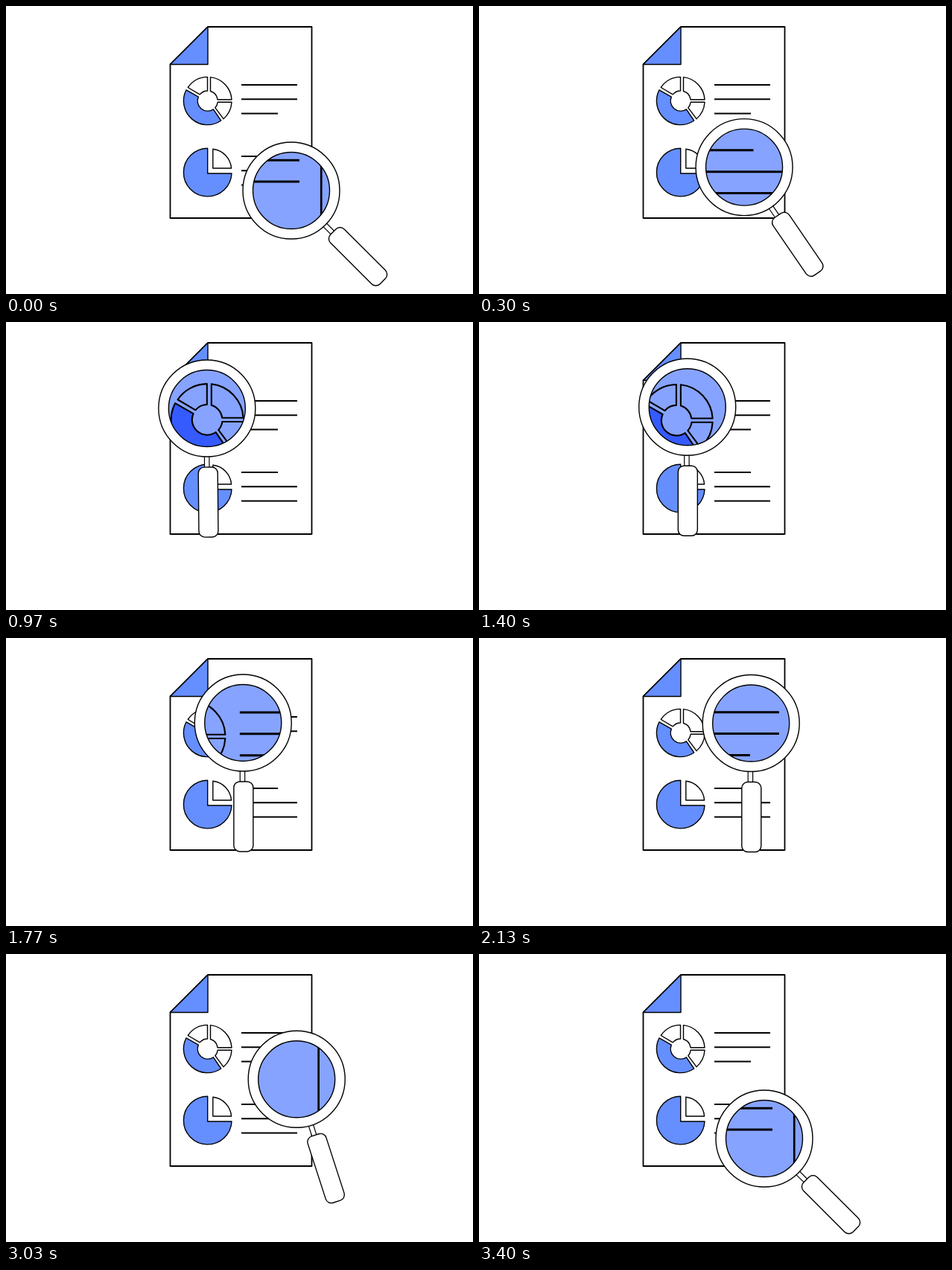
An HTML page with a canvas that plays this animation: 627 px wide and 387 px high, repeating every 3.66 s.

```html
<!DOCTYPE html>
<html lang="en">
<head>
<meta charset="utf-8">
<title>Report search</title>
<style>
html, body { margin: 0; width: 100%; height: 100%; overflow: hidden; background: #fff; }
canvas { display: block; }
</style>
</head>
<body>
<canvas id="stage" width="627" height="387"></canvas>
<script>
const ctx = document.getElementById('stage').getContext('2d');
const LOOP = 3660, BLUE = '#658eff', TINT = '#86a3ff', ZOOM = 1.5;

// Each move: start and end time, easing handles, poses [x, y, degrees], upward bow.
const rest = [383, 248, 45], left = [268.5, 114.5, 0], right = [395, 115.5, 0];
const moves = [
  { t0: 0, t1: 1050, ease: [0.3, 0.6], from: rest, to: left, bow: 0 },
  { t0: 1050, t1: 2690, ease: [0.44, 0.56], from: left, to: right, bow: 1 },
  { t0: 2690, t1: 3400, ease: [0.53, 0.56], from: right, to: rest, bow: 0 }
];

function easeInOut(u, [x1, x2]) {
  let lo = 0, hi = 1, s = 0.5;
  for (let i = 0; i < 24; i++) {
    s = (lo + hi) / 2;
    const x = 3 * s * (1 - s) ** 2 * x1 + 3 * s * s * (1 - s) * x2 + s ** 3;
    if (x < u) lo = s; else hi = s;
  }
  return s * s * (3 - 2 * s);
}

function poseAt(t) {
  const m = moves.find(move => t < move.t1);
  if (!m) return rest;
  const p = easeInOut((t - m.t0) / (m.t1 - m.t0), m.ease);
  const [x, y, angle] = m.from.map((v, i) => v + (m.to[i] - v) * p);
  return [x, y - 4 * m.bow * p * (1 - p), angle];
}

function shape(d, fill, width = 1.4) {
  const path = new Path2D(d);
  if (fill) {
    ctx.fillStyle = fill;
    ctx.fill(path);
  }
  ctx.lineWidth = width;
  ctx.stroke(path);
}

function ringSegment(x1, y1, x2, y2, x3, y3, x4, y4, fill) {
  shape(`M${x1} ${y1}A32.1 32.1 0 0 1 ${x2} ${y2}L${x3} ${y3}A13.6 13.6 0 0 0 ${x4} ${y4}Z`, fill);
}

function drawPage() {
  shape('M271 28H410.5V285H220.5V78.5Z', '#fff', 1.8);
  shape('M271 28V78.5H220.5Z', BLUE);

  ringSegment(244.3, 109.5, 270.5, 95.4, 270.5, 114, 260.2, 118.9, '#fff');
  ringSegment(274.5, 95.6, 303, 125.8, 284.1, 125.8, 274.5, 114.5, '#fff');
  ringSegment(303, 129.3, 292, 151.7, 280.8, 136.7, 284.2, 129.3, '#fff');
  ringSegment(288.7, 154, 242, 112.8, 258.3, 122.1, 278.4, 138.8, BLUE);

  shape('M270.7 225H303A32.3 32.3 0 1 1 270.7 191.3Z', BLUE);
  shape('M277.8 218V192.3A28 28 0 0 1 302.6 218Z', '#fff');

  shape('M316 106H391M316 125.2H391M316 144.5H365', null, 2);
  shape('M316 202H365M316 221.2H391M316 240.4H391', null, 2);
}

function circle(r) {
  ctx.beginPath();
  ctx.arc(0, 0, r, 0, 2 * Math.PI);
}

function drawGlass([x, y, angle]) {
  ctx.save();
  ctx.translate(x, y);

  // Handle
  ctx.save();
  ctx.rotate(-angle * Math.PI / 180);
  shape('M-4 62H2.4V82H-4Z', '#fff', 1.2);
  ctx.beginPath();
  ctx.roundRect(-12.4, 79, 26, 94, 8);
  ctx.fill();
  ctx.lineWidth = 1.4;
  ctx.stroke();
  ctx.restore();

  // Enlarged page seen through the lens
  ctx.save();
  circle(65);
  ctx.fillStyle = '#fff';
  ctx.fill();
  circle(51.5);
  ctx.clip();
  ctx.save();
  ctx.translate(-1, -2 + angle / 30);
  ctx.scale(ZOOM, ZOOM);
  ctx.translate(-x, -y);
  drawPage();
  ctx.restore();
  ctx.globalCompositeOperation = 'multiply';
  ctx.fillStyle = TINT;
  ctx.fillRect(-60, -60, 120, 120);
  ctx.restore();

  ctx.lineWidth = 1.4;
  for (const r of [51.5, 65]) {
    circle(r);
    ctx.stroke();
  }
  ctx.restore();
}

function draw() {
  ctx.fillStyle = '#fff';
  ctx.fillRect(0, 0, 627, 387);
  ctx.strokeStyle = '#000';
  ctx.lineJoin = 'round';
  drawPage();
  drawGlass(poseAt(performance.now() % LOOP));
  requestAnimationFrame(draw);
}
draw();
</script>
</body>
</html>
```
